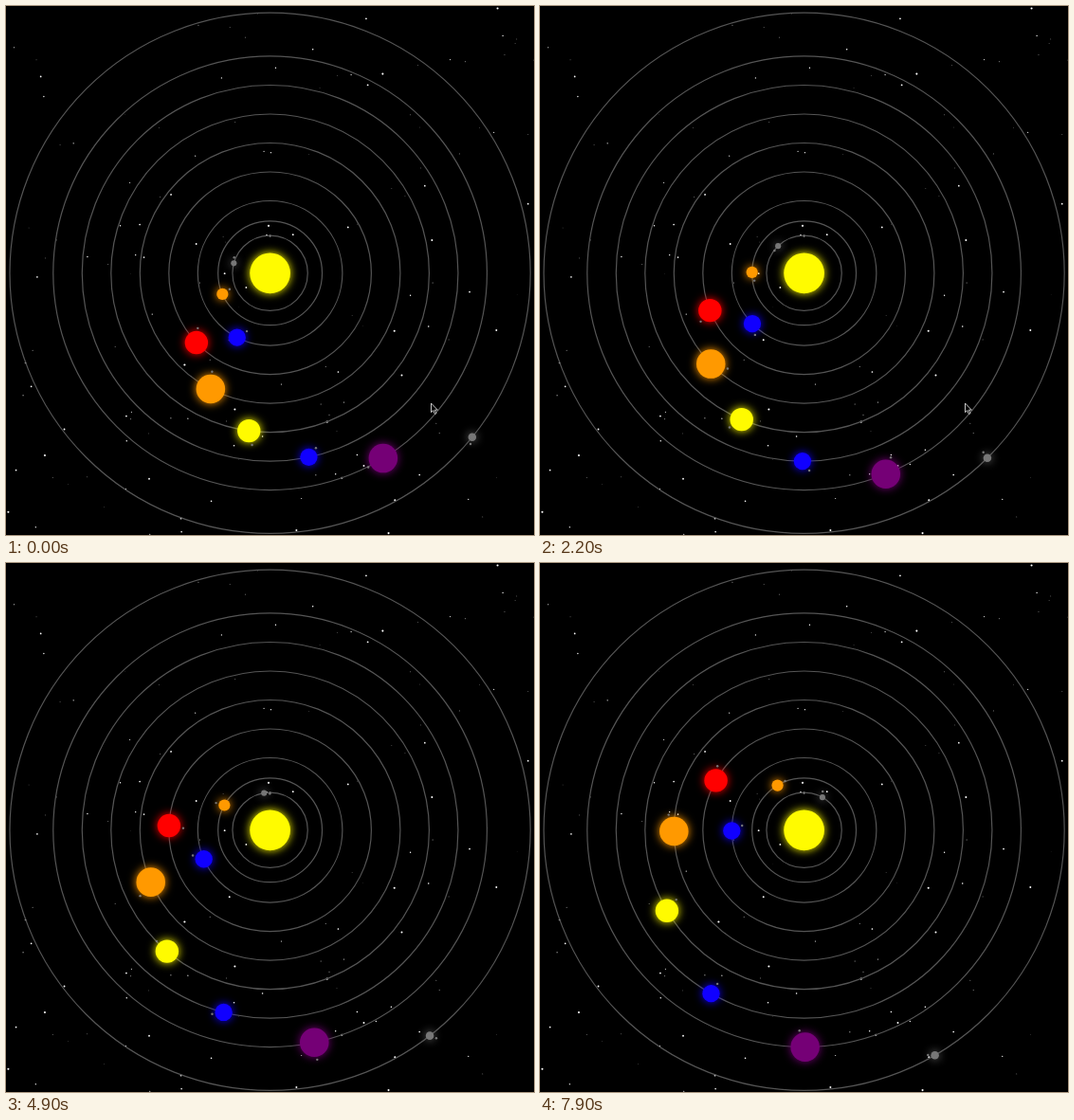
Animation of 557 by 558 pixels, one loop 8 s. Source, as an HTML page with a canvas:

```html
<!DOCTYPE html>
<html lang="en">
<head>
<meta charset="utf-8">
<title>Orbits</title>
<style>
html, body { margin: 0; width: 100%; height: 100%; overflow: hidden; background: #000; }
canvas { display: block; }
</style>
</head>
<body>
<canvas id="sky" width="557" height="558"></canvas>
<script>
const canvas = document.getElementById('sky');
const ctx = canvas.getContext('2d');
const { width: W, height: H } = canvas;
const LOOP = 8000, SCALE = 0.6102, CX = 278.6, CY = 281.8;
const GLOW = 10, STARS = 150;

const planets = [
  { orbit: 65,  size: 5,  speed: 10, moon: 69.3, color: '#777' },
  { orbit: 90,  size: 10, speed: 8,  moon: 35.1, color: '#f90' },
  { orbit: 125, size: 15, speed: 6,  moon: 35.2, color: '#1000ff' },
  { orbit: 175, size: 20, speed: 7,  moon: 69.4, color: '#f00' },
  { orbit: 225, size: 25, speed: 6,  moon: 32.5, color: '#f90' },
  { orbit: 275, size: 20, speed: 5,  moon: 22.4, color: '#fffb00' },
  { orbit: 325, size: 15, speed: 4,  moon: 34.2, color: '#1000ff' },
  { orbit: 375, size: 25, speed: 3,  moon: 44.5, color: '#750076' },
  { orbit: 450, size: 7,  speed: 2,  moon: 42.2, color: '#777' }
];

function seeded(seed) {
  return () => (seed = seed * 16807 % 2147483647) / 2147483647;
}

function disc(x, y, r, color, glow = 0) {
  ctx.shadowBlur = glow;
  ctx.shadowColor = color;
  ctx.fillStyle = color;
  ctx.beginPath();
  ctx.arc(x, y, r, 0, 2 * Math.PI);
  ctx.fill();
  ctx.shadowBlur = 0;
}

// point at a distance and an angle in degrees
function polar(x, y, dist, deg) {
  const a = deg * Math.PI / 180;
  return [x + dist * Math.cos(a), y + dist * Math.sin(a)];
}

// steady clock in steps, with a short rush at the start
function simTime(ms) {
  const step = ms < 400 ? 200 : 100;
  const t = Math.floor(ms / step) * step / 1000;
  return 19.81 + 1.279 * t - 0.28 * Math.max(0, 1 - t / 0.4);
}

function drawStars() {
  const rand = seeded(4711);
  for (let i = 0; i < STARS; i++) {
    disc(rand() * W, rand() * H, 0.2 + rand() * 0.9, '#fff');
  }
}

function drawOrbits() {
  ctx.strokeStyle = '#555';
  ctx.lineWidth = 1.2;
  for (const { orbit } of planets) {
    ctx.beginPath();
    ctx.arc(CX, CY, orbit * SCALE, 0, 2 * Math.PI);
    ctx.stroke();
  }
}

function drawPlanet({ orbit, size, speed, moon, color }, u) {
  const [x, y] = polar(CX, CY, orbit * SCALE, speed * u);
  disc(x, y, size * SCALE, color, GLOW);
  disc(...polar(x, y, (size + 5) * SCALE, moon * u), 1.2, '#777');
}

const arrow = new Path2D('M0 0v9.6l2.2-2 1.7 3.8 1.6-.7-1.7-3.6h3z');

// the pointer rests, then slides away to the right
function drawPointer(ms) {
  const slide = Math.max(0, (Math.floor(ms / 100) - 22) / 3);
  if (slide > 1) return;
  ctx.save();
  ctx.translate(448.5 + 64 * slide * slide, 419);
  ctx.fillStyle = '#000';
  ctx.fill(arrow);
  ctx.strokeStyle = '#ddd';
  ctx.lineWidth = 0.9;
  ctx.stroke(arrow);
  ctx.restore();
}

function draw(ms) {
  const u = simTime(ms);
  ctx.fillStyle = '#000';
  ctx.fillRect(0, 0, W, H);
  drawStars();
  drawOrbits();
  disc(CX, CY, 35 * SCALE, '#fffb00', GLOW);
  planets.forEach(p => drawPlanet(p, u));
  drawPointer(ms);
}

const start = performance.now();
function tick() {
  draw((performance.now() - start) % LOOP);
  requestAnimationFrame(tick);
}
tick();
</script>
</body>
</html>
```
